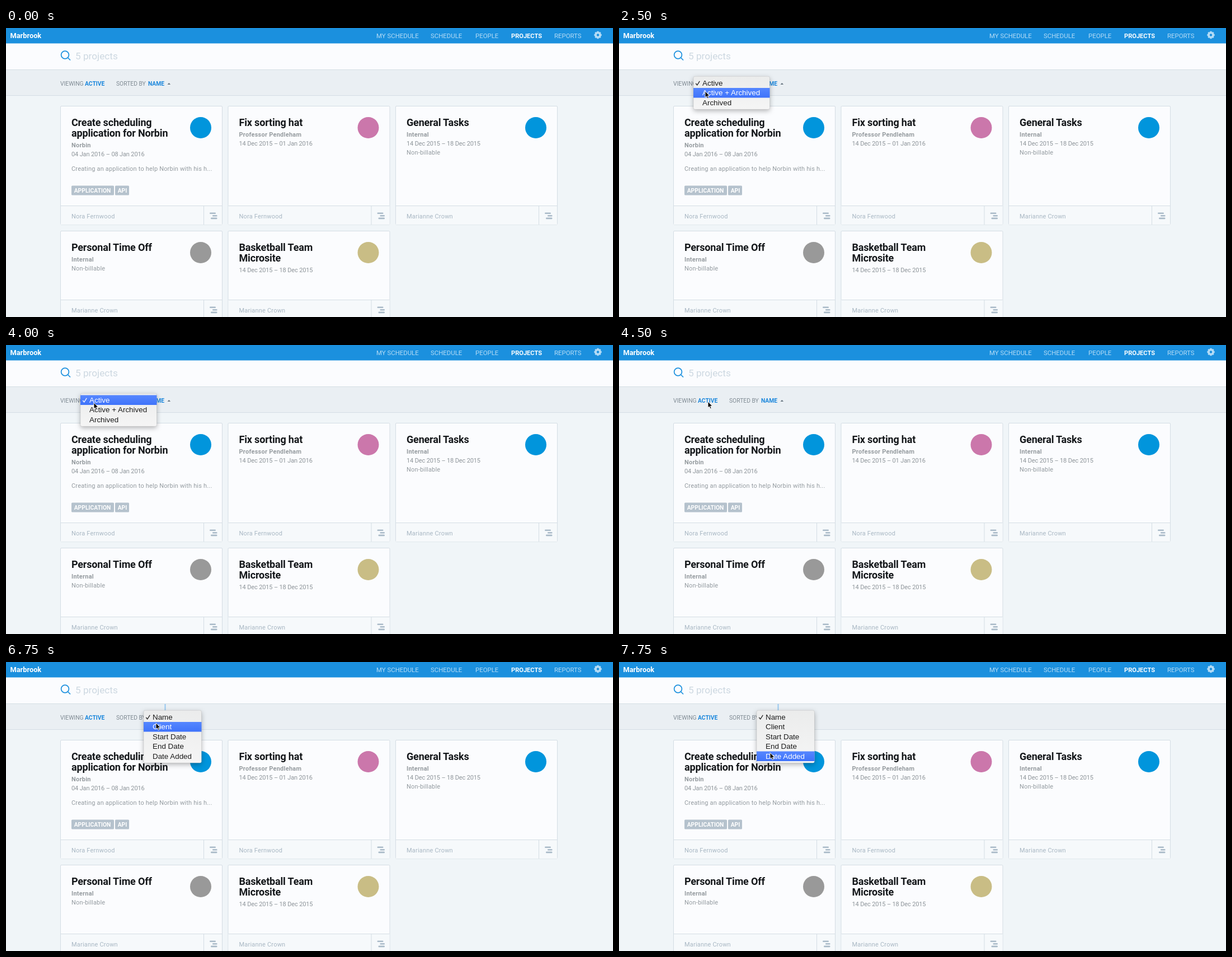
Recreate the animation shown at these times as an HTML page. Size 1085 by 516 pixels, loop 8 s.

```html
<!DOCTYPE html>
<html lang="en">
<head>
<meta charset="utf-8">
<title>Projects</title>
<style>
html, body { margin: 0; width: 100%; height: 100%; overflow: hidden; background: #f0f5f8; }
svg { display: block; width: 1085px; height: 516px; font: 11px Roboto, "Open Sans", sans-serif; }
.brand { font-size: 12.8px; font-weight: 700; fill: #fff; }
.nav { font-size: 11.4px; fill: #b5dcf6; }
.nav.on { font-size: 11.1px; font-weight: 700; fill: #fff; }
.search { font-size: 17.2px; fill: #cdd8e1; }
.filter { font-size: 10.3px; fill: #7f8a93; }
.filter.on { font-weight: 700; fill: #1b87dc; }
.title { font-size: 18px; font-weight: 700; letter-spacing: -.18px; fill: #14171a; }
.client { font-weight: 700; letter-spacing: .25px; fill: #959b9f; }
.date { letter-spacing: -.14px; fill: #8d9499; }
.note { letter-spacing: .18px; fill: #949ba0; }
.tag { font-size: 10.3px; font-weight: 700; fill: #fff; }
.owner { letter-spacing: .2px; fill: #a8b7c3; }
.menu { font: 13.4px "Liberation Sans", Arial, sans-serif; fill: #1c1c1c; filter: drop-shadow(0 3px 4px rgba(0,0,0,.28)); }
.menu .on { fill: #fff; }
</style>
</head>
<body>
<svg id="stage" viewBox="0 0 1085 516">
  <defs>
    <linearGradient id="panel" x2="0" y2="1">
      <stop offset="0" stop-color="#ebecec"/><stop offset="1" stop-color="#f5f5f5"/>
    </linearGradient>
    <linearGradient id="pick" x2="0" y2="1">
      <stop offset="0" stop-color="#5687ff"/><stop offset="1" stop-color="#3f73fa"/>
    </linearGradient>
  </defs>
  <g id="page"></g>
  <path id="caret" d="M124.5 41V59" stroke="#8795a0"/>
  <rect id="guide" x="283.5" y="75" width="2" height="45" fill="#97c8f0"/>
  <g id="menus"></g>
  <path id="cursor" d="M0 0V11L2.5 8.8 4.2 12.7 6.1 11.9 4.4 8.1H7.8Z" fill="#000" stroke="#fff" stroke-width=".9"/>
</svg>
<script>
const $ = id => document.getElementById(id);
const text = (x, y, cls, s) => `<text x="${x}" y="${y}" class="${cls}">${s}</text>`;
const rect = (x, y, w, h, fill, more = '') =>
  `<rect x="${x}" y="${y}" width="${w}" height="${h}" fill="${fill}" ${more}/>`;
const show = (el, on) => el.setAttribute('visibility', on ? 'visible' : 'hidden');

const LINE = '#d4dde4', BLUE = '#1b90de';

function gear(x, y) {
  let teeth = '';
  for (let a = 0; a < 360; a += 45)
    teeth += `<rect x="-1.7" y="-6.7" width="3.4" height="4" rx=".8" transform="rotate(${a})"/>`;
  return `<g transform="translate(${x} ${y})" fill="#b5dcf6">${teeth}
    <circle r="3.8" fill="none" stroke="#b5dcf6" stroke-width="3.2"/></g>`;
}

function topBars() {
  const nav = [[662, 'MY SCHEDULE'], [759, 'SCHEDULE'], [839, 'PEOPLE'], [903, 'PROJECTS'], [980, 'REPORTS']];
  return rect(0, 27, 1085, 47, '#fbfcfe') + rect(0, 74, 1085, 46, '#eaeff3') +
    rect(0, 74, 1085, 1, LINE) + rect(0, 120, 1085, 1, LINE) +
    rect(0, 0, 1085, 27.5, BLUE) + text(7.5, 18, 'brand', 'Marbrook') +
    nav.map(([x, s]) => text(x, 18, s === 'PROJECTS' ? 'nav on' : 'nav', s)).join('') + gear(1058, 12.5) +
    `<g fill="none" stroke="${BLUE}" stroke-width="1.7"><circle cx="105.5" cy="48" r="6.9"/><path d="M110.5 53L115 57.5"/></g>` +
    text(124, 56, 'search', '5 projects') +
    text(97, 102.8, 'filter', 'VIEWING') + text(141, 102.8, 'filter on', 'ACTIVE') +
    text(197, 102.8, 'filter', 'SORTED BY') + text(254, 102.8, 'filter on', 'NAME') +
    '<path d="M288.5 101L291.3 98L294.1 101Z" fill="#66747f"/>';
}

function card({ col, row, color, title, lines, about, tags = [], owner }) {
  const foot = row ? 123 : 178;
  const height = foot + 34;
  const shift = (title.length - 1) * 19;
  const bar = (x, y, w) => rect(x, foot + y, w, 2.6, '#a9bac8', 'rx="1.3"');
  return `<g transform="translate(${97 + col * 299.5} ${139 + row * 223})">` +
    rect(.5, .5, 289, height - .5, '#fbfcfe', `stroke="${LINE}" rx="1.5"`) +
    rect(1, foot, 288, 34, '#f6f9fb') +
    `<path d="M1 ${foot + .5}H289M256.5 ${foot}V${height}" stroke="${LINE}"/>` +
    `<circle cx="251" cy="39" r="19" fill="${color}"/>` +
    title.map((s, i) => text(20, 36.3 + i * 19, 'title', s)).join('') +
    lines.map(([cls, s], i) => text(20, 55 + shift + i * 16, cls, s)).join('') +
    (about ? text(20, 116, 'note', about) : '') +
    tags.map(([x, w, s]) => rect(x, 142.5, w, 17, '#b5c2cd', 'rx="1.5"') + text(x + 4.7, 155, 'tag', s)).join('') +
    text(20, foot + 22.7, 'owner', owner) +
    bar(267, 12.5, 11) + bar(272, 17, 8.5) + bar(269, 21.6, 11.5) + '</g>';
}

const cards = [
  { col: 0, row: 0, color: '#0195dc', title: ['Create scheduling', 'application for Norbin'],
    lines: [['client', 'Norbin'], ['date', '04 Jan 2016 – 08 Jan 2016']],
    about: 'Creating an application to help Norbin with his h...',
    tags: [[20, 76, 'APPLICATION'], [98, 25, 'API']], owner: 'Nora Fernwood' },
  { col: 1, row: 0, color: '#cb77ab', title: ['Fix sorting hat'],
    lines: [['client', 'Professor Pendleham'], ['date', '14 Dec 2015 – 01 Jan 2016']], owner: 'Nora Fernwood' },
  { col: 2, row: 0, color: '#0195dc', title: ['General Tasks'],
    lines: [['client', 'Internal'], ['date', '14 Dec 2015 – 18 Dec 2015'], ['note', 'Non-billable']], owner: 'Marianne Crown' },
  { col: 0, row: 1, color: '#999', title: ['Personal Time Off'],
    lines: [['client', 'Internal'], ['note', 'Non-billable']], owner: 'Marianne Crown' },
  { col: 1, row: 1, color: '#c9bd85', title: ['Basketball Team', 'Microsite'],
    lines: [['date', '14 Dec 2015 – 18 Dec 2015']], owner: 'Marianne Crown' }
];

const ROW_TOP = 89.5, ROW = 17.5;
const menus = [
  { x: 133, w: 136.5, items: ['Active', 'Active + Archived', 'Archived'] },
  { x: 246, w: 103.5, items: ['Name', 'Client', 'Start Date', 'End Date', 'Date Added'] }
];

function menuMarkup({ x, w, items }, picked) {
  const check = `<path d="M${x + 4.3} 99l2.4 3 4.5-7.2" fill="none" stroke="${picked ? '#1c1c1c' : '#fff'}" stroke-width="1.3"/>`;
  return '<g class="menu">' +
    rect(x, 86.3, w, items.length * ROW + 6.5, 'url(#panel)', 'rx="3" stroke="#000" stroke-opacity=".18" stroke-width=".5"') +
    rect(x, ROW_TOP + picked * ROW, w, ROW, 'url(#pick)') + check +
    items.map((s, i) => text(x + 16, 102.9 + i * ROW, i === picked ? 'on' : '', s)).join('') + '</g>';
}

// time, pointer x, pointer y, open menu (0 = none)
const steps = [
  [500, 352, 35, 0], [750, 181, 60, 0], [1000, 157, 101, 0], [1750, 157, 102, 0],
  [2000, 157, 102, 1], [2250, 156, 105, 1], [2500, 154, 113, 1],
  [3000, 153, 123, 1], [3250, 152, 137, 1], [3500, 152, 132, 1], [3750, 154, 118, 1], [4000, 157, 103, 1],
  [4250, 158, 101, 0], [4500, 159, 101, 0], [4750, 190, 104, 0], [5000, 240, 105, 0], [5250, 268, 103, 0],
  [6250, 268, 103, 2], [6750, 268, 109, 2], [7000, 268, 126, 2], [7250, 269, 138, 2],
  [7500, 270, 151, 2], [7750, 270, 162, 2]
];

$('page').innerHTML = rect(0, 0, 1085, 516, '#f0f5f8') + topBars() + cards.map(card).join('');

let last = null;
function draw(now) {
  const t = now % 8000;
  const step = steps.findLast(s => s[0] <= t);
  show($('caret'), t >= 1500 && t < 2000);
  show($('guide'), t >= 5500);
  if (step !== last) {
    last = step;
    const [, x = 0, y = 0, open = 0] = step || [];
    show($('cursor'), step);
    $('cursor').setAttribute('transform', `translate(${x} ${y})`);
    $('menus').innerHTML = open ? menuMarkup(menus[open - 1], Math.floor((y - ROW_TOP) / ROW)) : '';
  }
  requestAnimationFrame(draw);
}
draw(performance.now());
</script>
</body>
</html>
```
